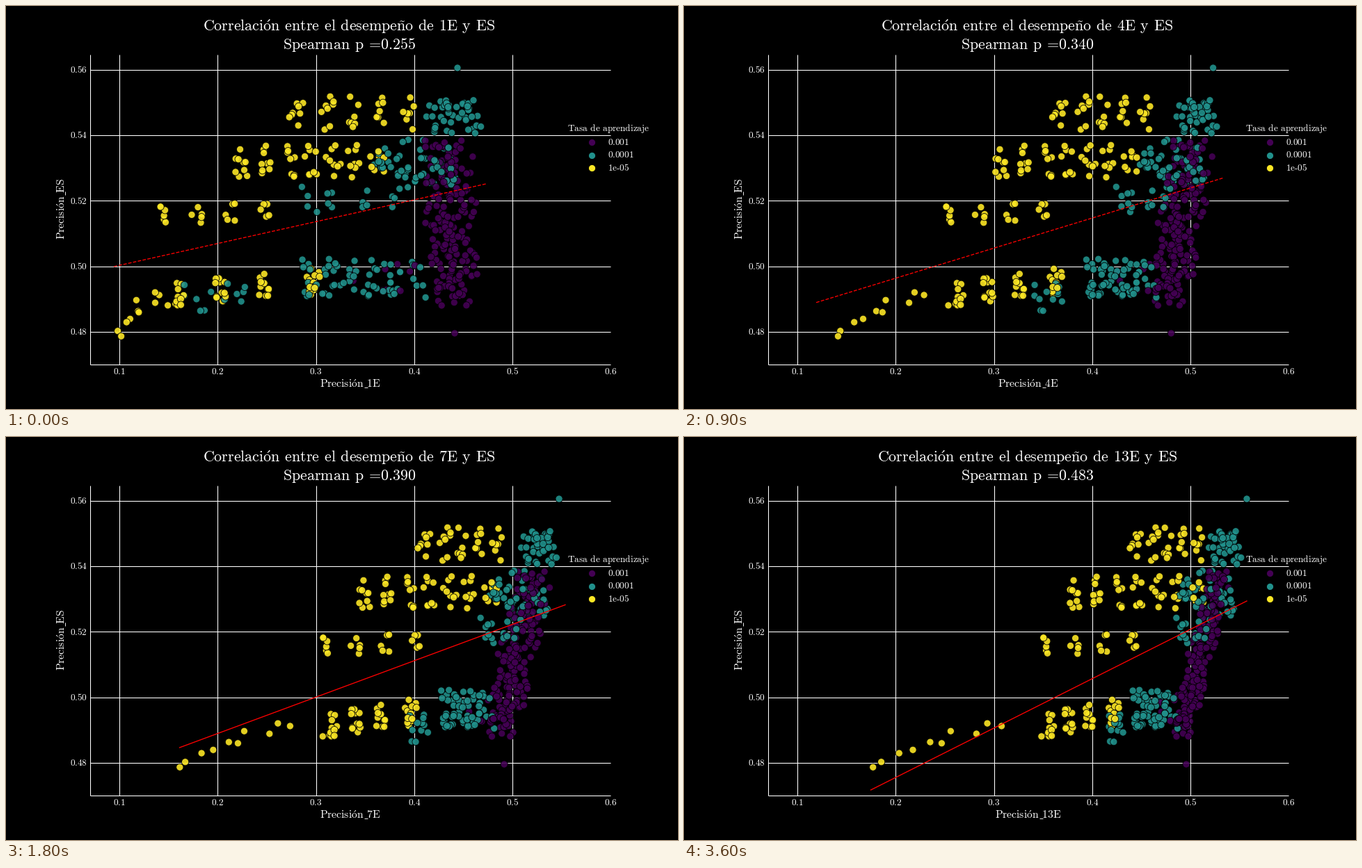
Animation, 966 px wide and 580 px high, one loop 3900 ms. Source, as a matplotlib script:

```python
import numpy as np
import matplotlib.pyplot as plt
from matplotlib.animation import FuncAnimation

W, H = 966, 580
STEPS = 13
LEFT, RIGHT, TOP, BOTTOM = 120.75, 869.4, 69.6, 516.2
PURPLE, TEAL, YELLOW = "#440154", "#21918c", "#fde725"

# How fast each colour settles, and its first and last horizontal spread
RATE = {PURPLE: 5, TEAL: 4.7, YELLOW: 2.7}
SPREAD = {PURPLE: (42, 20), TEAL: (18, 13), YELLOW: (14, 11)}

plt.rcParams.update({"mathtext.fontset": "cm", "mathtext.default": "rm"})
rng = np.random.default_rng(7)
dots = []


def cloud(colour, n, cols, y, first, last, tilt=0):
    """Dots in evenly spaced columns that drift from one x range to another."""
    q = (np.arange(n) % cols) / max(cols - 1, 1)
    height = (1 - tilt) * rng.uniform(0, 1, n) + tilt * q
    jitter = rng.triangular(-1, 0, 1, n) if n > 1 else np.zeros(1)
    for a, h, j in zip(q, height, jitter):
        dots.append((first[0] + a * (first[1] - first[0]),
                     last[0] + a * (last[1] - last[0]),
                     y[0] + h * (y[1] - y[0]), j, colour))


cloud(YELLOW, 37, 5, (130, 178), (420, 579), (651, 739))
cloud(YELLOW, 58, 7, (200, 248), (339, 535), (562, 740))
cloud(YELLOW, 21, 4, (284, 313), (225, 373), (519, 646))
cloud(YELLOW, 48, 4, (434, 376), (243, 438), (522, 615), tilt=0.3)
cloud(YELLOW, 10, 10, (477, 402), (166, 212), (272, 450), tilt=0.8)
cloud(TEAL, 42, 5, (134, 184), (612, 676), (760, 796))
cloud(TEAL, 50, 6, (190, 266), (541, 640), (721, 786))
cloud(TEAL, 16, 4, (254, 300), (434, 563), (714, 754))
cloud(TEAL, 62, 8, (364, 420), (430, 590), (648, 700))
cloud(TEAL, 12, 6, (398, 440), (255, 350), (610, 630))
cloud(PURPLE, 180, 60, (190, 432), (638, 641), (772, 715), tilt=0.95)
cloud(PURPLE, 9, 5, (355, 413), (528, 588), (700, 715))
cloud(TEAL, 1, 1, (89, 89), (649, 649), (809, 809))
cloud(PURPLE, 1, 1, (471, 471), (645, 645), (722, 722))

rng.shuffle(dots)
first, last, ys, jitter = (np.array([d[k] for d in dots], float)
                           for k in range(4))
colours = [d[4] for d in dots]
rates = np.array([RATE[c] for c in colours])
wide, narrow = np.array([SPREAD[c] for c in colours]).T


def keyed(*values):
    """Values at every second step, filled in between."""
    return np.interp(np.arange(STEPS), np.arange(0, STEPS, 2), values)


x_left = keyed(155, 157, 223, 249.5, 262, 267, 268.5)
x_right = keyed(690, 759.5, 792, 804, 805, 810, 809)
y_left = keyed(375, 420.5, 433, 447, 466.5, 487, 508)
y_right = keyed(256, 250.5, 244, 241.5, 240.5, 237, 236)
spearman = keyed(.255, .317, .363, .390, .422, .457, .483)


def tex(s):
    for old, new in ((" ", r"\hspace{0.4}"), ("_", r"\hspace{0.432}"),
                     ("=", r"\text{=}"), ("-", r"\text{-}"),
                     ("ó", r"\acute{o}"), ("ñ", r"\tilde{n}")):
        s = s.replace(old, new)
    return f"${s}$"


# At 72 dpi one point is one pixel
fig = plt.figure(figsize=(W / 72, H / 72), dpi=72, facecolor="black")
ax = fig.add_axes([0, 0, 1, 1])
ax.set_xlim(0, W)
ax.set_ylim(H, 0)
ax.axis("off")


def label(x, y, s, size=13.25, ha="center", **kw):
    return ax.text(x, y, tex(s), fontsize=size, ha=ha, va="baseline",
                   color="white", zorder=6, **kw)


def rule(x, y, lw=1.07, z=1):
    return ax.plot(x, y, color="white", lw=lw, zorder=z,
                   solid_capstyle="butt")[0]


def markers(x, y, c, **kw):
    return ax.scatter(x, y, s=104, c=c, edgecolors="black", linewidths=0.9, **kw)


for i in range(6):
    x = 163 + 141.3 * i
    label(x, 529.8, f"{0.1 * (i + 1):.1f}")
    if x < RIGHT - 1:
        rule([x, x], [TOP, BOTTOM])
for i in range(5):
    y = 92 + 94.2 * i
    label(116.8, y + 4.3, f"{0.56 - 0.02 * i:.2f}", ha="right")
    rule([LEFT, RIGHT], [y, y])
rule([LEFT, LEFT], [TOP, BOTTOM])
rule([LEFT, RIGHT], [BOTTOM, BOTTOM])

title = label(493.5, 36.5, "", 22)
subtitle = label(494, 62, "", 22)
xlabel = label(495, 549, "", 15.65)
x_bar = rule([], [], 0.9, 6)
label(85, 292, "Precisión_ES", 15.65, rotation=90, rotation_mode="anchor")
rule([84.6, 84.6], [271.5, 266.8], 0.9, 6)

label(807, 179.6, "Tasa de aprendizaje", ha="left")
for i, (name, colour) in enumerate((("0.001", PURPLE), ("0.0001", TEAL),
                                    ("1e-05", YELLOW))):
    y = 196 + 18.7 * i
    markers([842], [y], colour, zorder=6)
    label(865, y + 3.8, name, ha="left")

points = markers(first, ys, colours, alpha=0.9, zorder=3)
trend, = ax.plot([], [], color="red", lw=1.33, zorder=4)


def update(i):
    s = i / (STEPS - 1)
    ease = (1 - np.exp(-rates * s)) / (1 - np.exp(-rates))
    spread = wide + (narrow - wide) * s
    xs = first + (last - first) * ease + jitter * spread
    points.set_offsets(np.column_stack([xs, ys]))

    trend.set_data([x_left[i], x_right[i]], [y_left[i], y_right[i]])
    trend.set_linestyle("--" if i < STEPS // 2 else "-")

    epoch = f"{i + 1}E"
    title.set_text(tex(f"Correlación entre el desempeño de {epoch} y ES"))
    subtitle.set_text(tex(f"Spearman p ={spearman[i]:.3f}"))
    xlabel.set_text(tex(f"Precisión_{epoch}"))
    bar = 515.2 - 3.9 * (len(epoch) - 2)
    x_bar.set_data([bar, bar + 4.7], [548.6, 548.6])
    return points, trend, title, subtitle, xlabel, x_bar


anim = FuncAnimation(fig, update, frames=STEPS, interval=300, repeat=True,
                     repeat_delay=0, blit=False)
plt.show()
```
